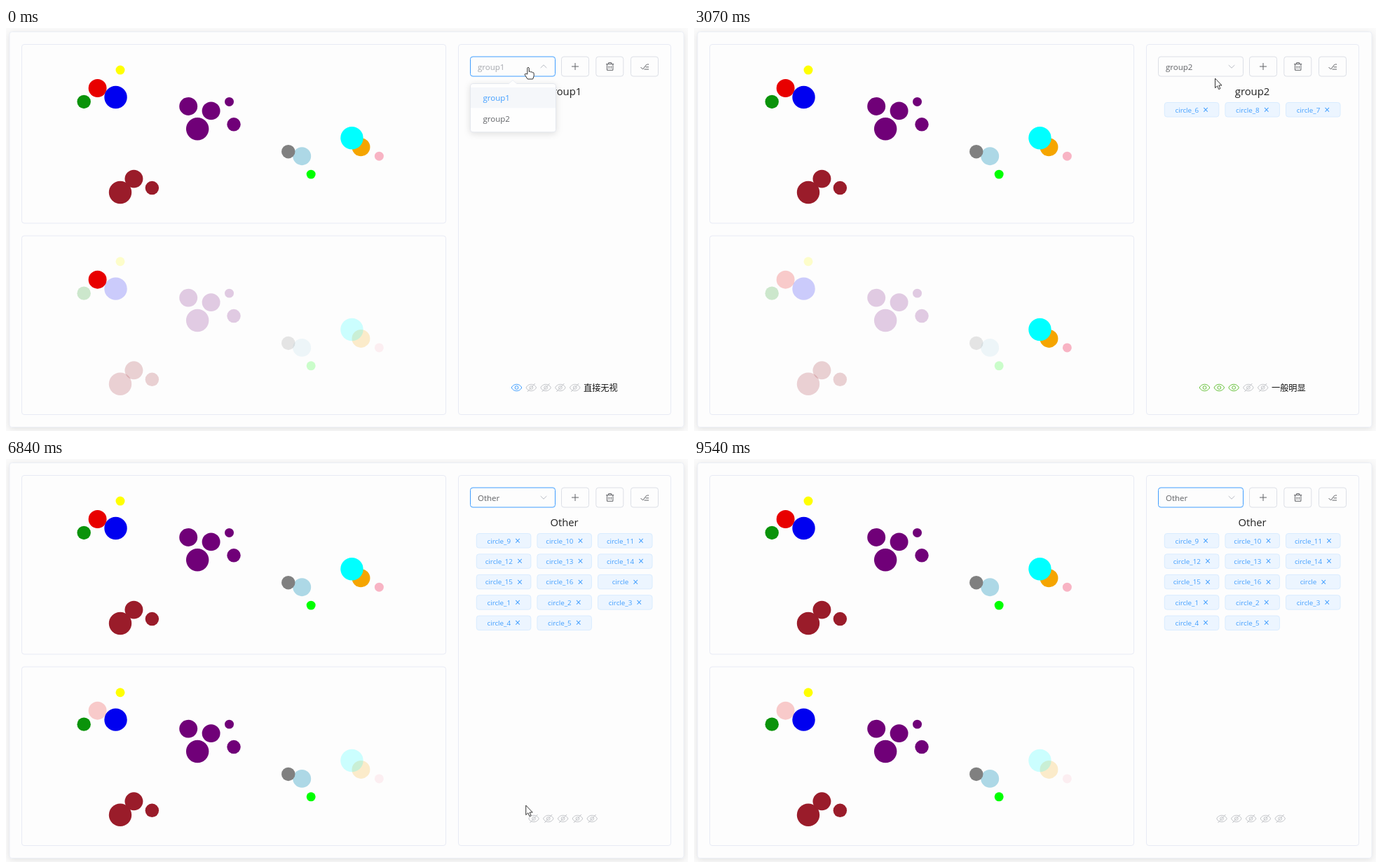
These frames come from a looping animation (973 px wide and 576 px high, 9600 ms). An HTML page:

```html
<!DOCTYPE html>
<html lang="zh-CN">
<head>
<meta charset="utf-8">
<style>
  html, body { margin: 0; width: 100%; height: 100%; overflow: hidden; background: #fbfbfb; }
  svg { display: block; width: 973px; height: 576px; font-family: "Open Sans", "Noto Sans CJK SC", "Noto Sans CJK", sans-serif; }
  .card { fill: #fdfdfd; stroke: #ebeef5; filter: drop-shadow(0 2px 5px rgba(0, 0, 0, .1)); }
  .panel { fill: none; stroke: #e8ebf5; }
  .box { fill: #fdfdfd; stroke: #dcdfe6; }
  .focus { stroke: #409eff; }
  .icon { fill: none; stroke: #606266; }
  .menu { fill: #fefefe; stroke: #e4e7ed; filter: drop-shadow(0 2px 5px rgba(0, 0, 0, .12)); }
  .tag rect { fill: #ecf5ff; stroke: #d9ecff; }
  .tag text { fill: #409eff; font-size: 9.8px; text-anchor: middle; }
  .cursor { fill: #fff; stroke: #333; stroke-linejoin: round; }
</style>
</head>
<body>
<svg id="stage" viewBox="0 0 973 576">
  <g id="fixed"></g>
  <g id="live"></g>
</svg>
<script>
const LOOP = 9600, UNIT = 6.48;
const OPENED = 3380, CHOSE_SECOND = 560, ADDED = 2150, CHOSE_OTHER = 4700;

// x, y and radius in grid units, colour, group
const circles = [
  [12, 13, 1.5, '#0a930a', 2], [15, 10, 2, '#e80000', 0], [19, 12, 2.5, '#0000f0', 2],
  [20, 6, 1, '#ff0', 2],
  [35, 14, 2, '#700078', 2], [40, 15, 2, '#700078', 2], [44, 13, 1, '#700078', 2],
  [45, 18, 1.5, '#700078', 2], [37, 19, 2.5, '#700078', 2],
  [20, 33, 2.5, '#9a1c2a', 2], [23, 30, 2, '#9a1c2a', 2], [27, 32, 1.5, '#9a1c2a', 2],
  [60, 25, 2, '#add8e6', 2], [57, 24, 1.5, '#808080', 2], [62, 29, 1, '#0f0', 2],
  [73, 23, 2, '#f5a500', 1], [71, 21, 2.5, '#0ff', 1], [77, 25, 1, '#f8b4c4', 1]
];
const groups = [
  { name: 'group1', tags: [0], rate: 1 },
  { name: 'group2', tags: [6, 8, 7], rate: 3 },
  { name: 'Other', tags: [9, 10, 11, 12, 13, 14, 15, 16, '', 1, 2, 3, 4, 5], rate: 0 }
];
const labels = { 1: '直接无视', 3: '一般明显' };

// time, x, y of the pointer tip
const path = [
  [0, 745, 56], [120, 745, 58], [420, 712, 127], [600, 708, 130], [1000, 716, 140],
  [1400, 720, 146], [1950, 910, 58], [2350, 910, 58], [3070, 743, 72], [3250, 738, 58],
  [3500, 738, 58], [4200, 729, 152], [4340, 729, 154], [4800, 729, 156], [5500, 795, 360],
  [5900, 798, 377], [6400, 790, 400], [7000, 731, 515], [7800, 730, 517], [8400, 730, 517],
  [9000, 800, 590], [LOOP, 800, 600]
];

const clamp = v => Math.max(0, Math.min(1, v));
const smooth = v => v * v * (3 - 2 * v);
const inside = (p, x, y, w, h) => p.x >= x && p.x <= x + w && p.y >= y && p.y <= y + h;
const rect = (x, y, w, h, cls, r = 3.5) =>
  `<rect x="${x}" y="${y}" width="${w}" height="${h}" rx="${r}" class="${cls}"/>`;
const text = (x, y, size, fill, str, anchor = 'start') =>
  `<text x="${x}" y="${y}" font-size="${size}" fill="${fill}" text-anchor="${anchor}">${str}</text>`;
const icon = (x, y, d, extra = '') =>
  `<path class="icon" transform="translate(${x} ${y})" d="${d}" ${extra}/>`;

function pointer(t) {
  const i = path.findIndex((p, n) => n && t <= p[0]);
  const [t0, x0, y0] = path[i - 1], [t1, x1, y1] = path[i];
  const k = smooth((t - t0) / (t1 - t0));
  return { x: x0 + (x1 - x0) * k, y: y0 + (y1 - y0) * k };
}

const plot = (dy, active) => circles.map(([x, y, r, fill, group]) =>
  `<circle cx="${33.4 + x * UNIT}" cy="${21.2 + dy + y * UNIT}" r="${r * UNIT}" fill="${fill}"
    opacity="${active === undefined || active === group ? 1 : .2}"/>`).join('');

const tag = (id, i) => {
  const x = 671.3 + i % 3 * 86.6, y = 106.5 + Math.floor(i / 3) * 29.4;
  const name = id === '' ? 'circle' : 'circle_' + id;
  return `<g class="tag">${rect(x, y, 77.5, 20.5, '')}<text x="${x + 39}" y="${y + 14}">${name}<tspan
    dx="6" dy="1.2" font-size="14">×</tspan></text></g>`;
};

function rating(value, hovered) {
  const start = value ? 728.5 : 753, color = value < 3 ? '#409eff' : '#67c23a';
  let out = value ? text(824, 518.5, 12.2, '#111', labels[value]) : '';
  for (let i = 0; i < 5; i++) {
    const on = i < value, scale = hovered && i === value - 1 ? 1.15 : 1;
    out += `<g transform="translate(${start + i * 20.8} 514) scale(${scale})" fill="none"
      stroke="${on ? color : '#c4c6ca'}"><path d="M-7.3 0C-4.5-6.3 4.5-6.3 7.3 0C4.5 6.3-4.5 6.3-7.3 0Z"/>
      <circle r="2.4"/>${on ? '' : '<path d="M5.5-6L-5.5 6"/>'}</g>`;
  }
  return out;
}

function menu(selected, count, hover, show) {
  if (show <= 0) return '';
  const items = groups.slice(0, count).map((g, i) => {
    const y = 85 + i * 29.4;
    return (i === hover ? `<rect x="663" y="${y}" width="121" height="29.4" fill="#f5f7fa"/>` : '') +
      text(680.5, y + 19.3, 11.5, i === selected ? '#409eff' : '#606266', g.name);
  }).join('');
  return `<g opacity="${show}" transform="translate(0 79) scale(1 ${show}) translate(0 -79)">
    ${rect(662.5, 79.5, 122, 10.5 + count * 29.4, 'menu')}
    <path d="M717 80L723 74.5L729 80" fill="#fefefe" stroke="#ebeef5"/>${items}</g>`;
}

const cursor = (p, hand) => `<path class="cursor" transform="translate(${p.x} ${p.y})" d="${hand
  ? 'M-1.2 10V1.2Q0-.8 1.3 1.2V6.5Q2.7 5.2 3.8 7Q5.2 6 6.2 7.7Q8.2 7.2 8.2 9.3V12.5L6.6 17H-.8L-4.6 11.3Q-5.4 9.6-3.8 9.3Z'
  : 'M.5 0V13.6L3.6 10.8L5.7 15.6L7.9 14.6L5.8 10H10Z'}"/>`;

function scene(t) {
  const p = pointer(t);
  const selected = t < CHOSE_SECOND ? 0 : t < CHOSE_OTHER ? 1 : 2;
  const group = groups[selected];
  const open = t < CHOSE_SECOND || t >= OPENED && t < CHOSE_OTHER;
  const focused = t < ADDED || t >= OPENED;
  const count = t < ADDED ? 2 : 3;
  const show = t < ADDED ? 1 - clamp((t - CHOSE_SECOND) / 250)
    : clamp((t - OPENED) / 250) * (1 - clamp((t - CHOSE_OTHER) / 250));
  const row = Math.floor((p.y - 85) / 29.4);
  const overMenu = open && inside(p, 663, 85, 121, count * 29.4);
  const overEyes = inside(p, 720, 506, 102, 17);
  const hand = overMenu || overEyes || inside(p, 663, 41, 121, 28) || inside(p, 891, 41, 40, 28);
  const value = overEyes ? 1 : group.rate;

  return plot(273.7, selected) +
    rect(662.5, 41, 121, 28, 'box' + (focused ? ' focus' : '')) +
    text(673, 59.6, 11.5, open ? '#a4a7ad' : '#606266', group.name) +
    icon(767, 55, open ? 'M-4.3 2L0-2.2L4.3 2' : 'M-4.3-2L0 2.2L4.3-2', 'style="stroke:#b8bcc4"') +
    text(796.5, 96, 14.8, '#222', group.name, 'middle') +
    group.tags.map(tag).join('') + rating(value, overEyes) +
    menu(selected, count, overMenu ? row : selected, show) + cursor(p, hand);
}

document.getElementById('fixed').innerHTML =
  rect(5, 5.5, 962, 565, 'card') +
  rect(22.5, 23.5, 605, 255.5, 'panel') + rect(22.5, 297, 605, 255.5, 'panel') +
  rect(645.5, 23.5, 303, 529, 'panel') +
  [792.5, 841.8, 891.5].map(x => rect(x, 41, 39, 28, 'box')).join('') +
  icon(812, 55, 'M-5 0H5M0-5V5') +
  icon(861.7, 55, 'M-5.5-3.5H5.5M-2-3.5V-5.5H2V-3.5M-4.2-3.5V5.3H4.2V-3.5M-1.5-1V3M1.5-1V3') +
  icon(911, 55, 'M-5.5 1L-2.5 4L3-3M3.5-3H6M1.5 .8H6M-.5 4H6') +
  plot(0);

const live = document.getElementById('live');
function frame() {
  live.innerHTML = scene(performance.now() % LOOP);
  requestAnimationFrame(frame);
}
frame();
</script>
</body>
</html>
```
